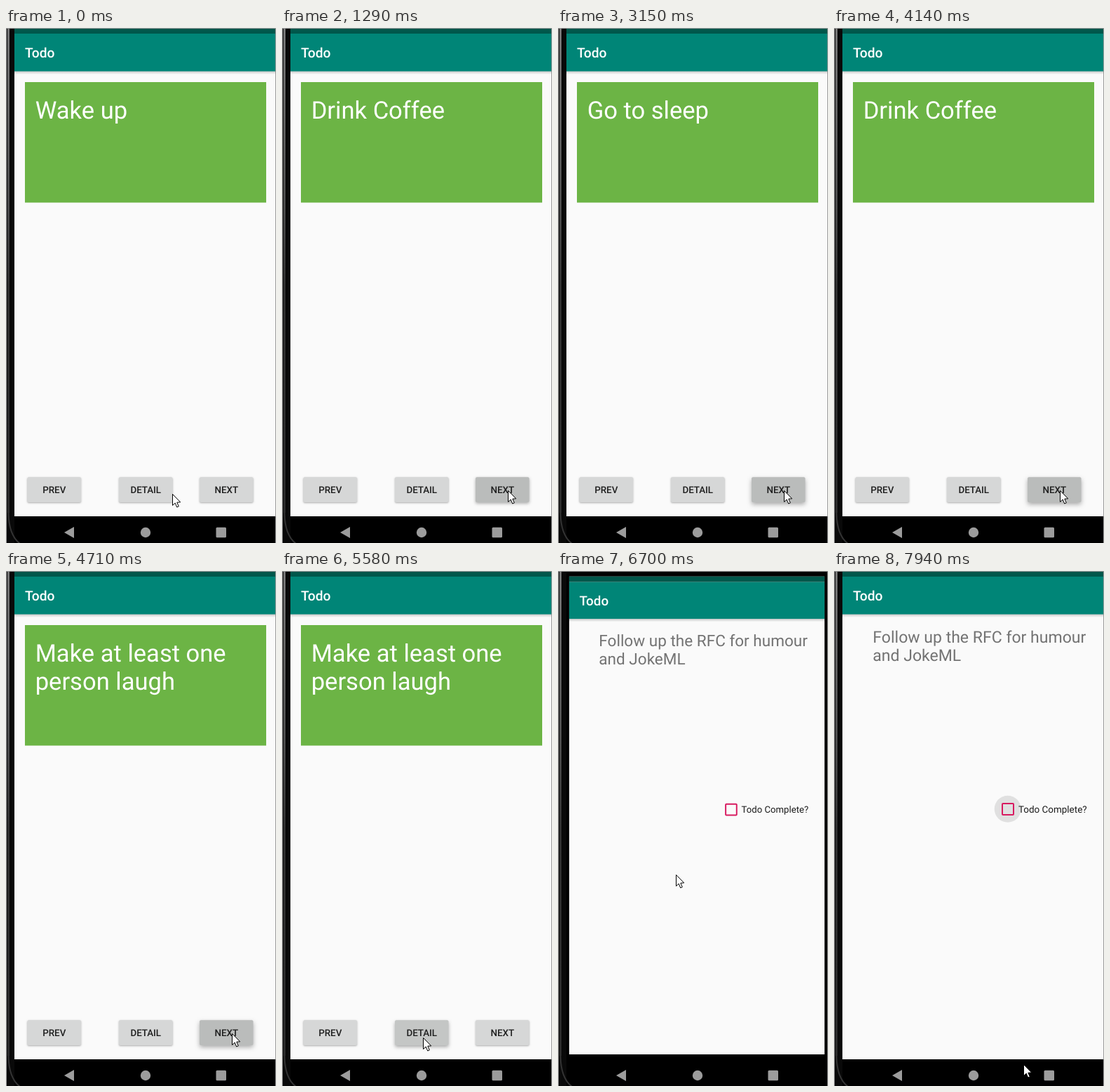
Animation of 385 by 733 pixels, one loop 8 s. Source, as an HTML page with a canvas:

```html
<!DOCTYPE html>
<html lang="en">
<head>
<meta charset="utf-8">
<title>Todo</title>
<style>
  html, body { margin: 0; width: 100%; height: 100%; overflow: hidden; background: #000; }
  canvas { display: block; }
</style>
</head>
<body>
<canvas id="stage" width="385" height="733"></canvas>
<script>
const LOOP = 8000;
const ctx = document.getElementById('stage').getContext('2d');
ctx.textRendering = 'geometricPrecision';

const todos = [['Wake up'], ['Drink Coffee'], ['Make at least one', 'person laugh'], ['Eat dinner'], ['Go to sleep']];
const nextClicks = [1290, 1890, 2420, 3000, 3570, 3990, 4570];
const detailClick = 5580;

const bursts = [
  [150, 570, 4],
  ...nextClicks.slice(0, -1).map(t => [t, t + 300, 3]),
  [4570, 5580, 8], [5720, 6700, 8], [6830, 7790, 8], [7940, 7940, 1]
];

// Pointer path: time, x, y.
const pointerPath = [
  [10, 237, 663], [570, 322, 658], [4870, 322, 658], [5160, 262, 676], [5440, 201, 664],
  [5850, 201, 664], [6430, 166, 480], [6700, 168, 432], [6970, 197, 341],
  [7240, 243, 337], [7650, 243, 337], [7790, 262, 668], [7940, 270, 702]
];

const clamp = v => Math.max(0, Math.min(1, v));
const progress = (t, from, to) => clamp((t - from) / (to - from));
const mix = (a, b, p) => a + (b - a) * p;

function refreshTime(t) {
  const burst = bursts.filter(b => b[0] <= t).pop();
  if (!burst) return 0;
  const [start, end, count] = burst;
  if (count === 1) return start;
  const step = (end - start) / (count - 1);
  return start + step * Math.min(count - 1, Math.floor((t - start) / step + 0.05));
}

function pointerAt(t) {
  const i = pointerPath.findIndex(k => k[0] >= t);
  if (i < 0) return pointerPath[pointerPath.length - 1].slice(1);
  if (i === 0) return pointerPath[0].slice(1);
  const a = pointerPath[i - 1], b = pointerPath[i];
  const p = progress(t, a[0], b[0]);
  return [mix(a[1], b[1], p), mix(a[2], b[2], p)];
}

function rect(x, y, w, h, color) {
  ctx.fillStyle = color;
  ctx.fillRect(x, y, w, h);
}

function roundRect(x, y, w, h, r, color) {
  ctx.fillStyle = color;
  ctx.beginPath();
  ctx.roundRect(x, y, w, h, r);
  ctx.fill();
}

function disc(x, y, r, color) {
  ctx.fillStyle = color;
  ctx.beginPath();
  ctx.arc(x, y, r, 0, 2 * Math.PI);
  ctx.fill();
}

function polyline(points) {
  ctx.beginPath();
  points.forEach(([x, y]) => ctx.lineTo(x, y));
}

function text(str, x, y, size, color, weight = 400, align = 'left') {
  ctx.font = `${weight} ${size}px Roboto, sans-serif`;
  ctx.textAlign = align;
  ctx.fillStyle = color;
  ctx.fillText(str, x, y);
}

function windowFrame() {
  rect(12, 0, 372, 695, '#fafafa');
  const shadow = ctx.createLinearGradient(0, 61.5, 0, 66);
  shadow.addColorStop(0, 'rgba(0,0,0,.2)');
  shadow.addColorStop(1, 'rgba(0,0,0,0)');
  rect(12, 61, 372, 5, shadow);
  rect(12, 8, 372, 53.6, '#008577');
  rect(12, 0, 372, 8, '#00574b');
  rect(12, 695, 372, 60, '#000');
  text('Todo', 27, 42.3, 19.2, '#fff', 500);
}

function button(label, x, width, face, lift) {
  ctx.save();
  ctx.shadowColor = 'rgba(0,0,0,.32)';
  ctx.shadowBlur = 2.5 + 4 * lift;
  ctx.shadowOffsetY = 1 + 2 * lift;
  roundRect(x, 639.3, width, 35.6, 2, face);
  ctx.restore();
  text(label, x + width / 2, 662, 13.4, '#1f1f1f', 500, 'center');
}

function listScreen(t) {
  windowFrame();
  rect(27, 77, 344, 171.5, '#6cb445');
  const clicks = nextClicks.filter(c => c <= t);
  todos[clicks.length % todos.length].forEach((line, i) => text(line, 41.7, 129 + 40.3 * i, 34.56, '#fff'));

  const nextAge = t - clicks[clicks.length - 1];
  const nextDown = nextAge < 290;
  const detailAge = t - detailClick;
  const detailDown = detailAge >= 0 && detailAge < 400;
  const detailFace = detailAge < 100 ? '#c4c6c5' : '#babcbb';
  button('PREV', 30.5, 76.5, '#d6d7d7', 0);
  button('DETAIL', 161, 76.5, detailDown ? detailFace : '#d6d7d7', detailDown ? 0.8 : 0);
  button('NEXT', 276, 76.5, nextDown ? '#babcbb' : '#d6d7d7', nextDown ? mix(0.4, 1, clamp(nextAge / 150)) : 0);
}

function checkbox(checked) {
  ctx.lineWidth = 2;
  if (checked) {
    roundRect(239, 330, 18, 18, 2, '#d81b60');
    ctx.strokeStyle = '#fafafa';
    polyline([[241.5, 339.3], [245.8, 343.6], [254.5, 334.9]]);
  } else {
    ctx.strokeStyle = '#d81b60';
    ctx.beginPath();
    ctx.roundRect(240, 331, 16, 16, 1);
  }
  ctx.stroke();
}

function detailScreen(t) {
  windowFrame();
  text('Follow up the RFC for humour', 55.3, 101.5, 23.04, '#737373');
  text('and JokeML', 55.3, 128.3, 23.04, '#737373');
  if (t >= 7370) disc(247.7, 338.7, 19, '#e0e0e0');
  checkbox(t >= 7370 && t < 7900);
  text('Todo Complete?', 263, 344, 13.44, '#1c1c1c');
}

function scaled(scale, alpha, draw) {
  ctx.save();
  ctx.globalAlpha = alpha;
  ctx.translate(198, 367);
  ctx.scale(scale, scale);
  ctx.translate(-198, -367);
  draw();
  ctx.restore();
}

function navigationIcons() {
  ctx.fillStyle = '#9c9c9c';
  polyline([[83, 718], [97, 710], [97, 726]]);
  ctx.fill();
  disc(199, 718, 7.2, '#9c9c9c');
  roundRect(299.5, 710.8, 14.5, 14.5, 1.5, '#9c9c9c');
}

function bezel() {
  rect(0, 0, 12, 733, '#090909');
  const edge = ctx.createLinearGradient(0, 0, 0, 733);
  edge.addColorStop(0, '#777');
  edge.addColorStop(0.35, '#4a4a4a');
  edge.addColorStop(0.5, '#303030');
  edge.addColorStop(1, '#2a2a2a');
  rect(2, 0, 3, 690, edge);
  ctx.strokeStyle = '#333';
  ctx.lineWidth = 2;
  ctx.beginPath();
  ctx.moveTo(3.5, 690);
  ctx.quadraticCurveTo(4, 722, 20, 734);
  ctx.stroke();
  rect(0, 0, 1, 733, '#9a9a9a');
  rect(0, 0, 385, 1, '#9a9a9a');
  rect(384, 0, 1, 733, '#9a9a9a');
}

function pointer(x, y) {
  ctx.save();
  ctx.translate(x + 0.5, y + 0.5);
  polyline([[0, 0], [0, 16], [3.7, 12.6], [6.2, 18.5], [8.8, 17.4], [6.3, 11.7], [11.2, 11.4]]);
  ctx.closePath();
  ctx.fillStyle = '#fff';
  ctx.fill();
  ctx.strokeStyle = '#000';
  ctx.lineWidth = 1;
  ctx.stroke();
  ctx.restore();
}

function render(t) {
  rect(0, 0, 385, 733, '#000');
  const opening = progress(t, 6415, 6700);
  if (opening < 1) scaled(1 + 0.05 * progress(t, 6415, 6565), 1, () => listScreen(t));
  if (t > 6480) scaled(mix(0.94, 1, progress(t, 6480, 6820)), progress(t, 6480, 6690), () => detailScreen(t));
  navigationIcons();
  bezel();
  pointer(...pointerAt(t));
}

function tick() {
  render(refreshTime(performance.now() % LOOP));
  requestAnimationFrame(tick);
}
tick();
</script>
</body>
</html>
```
